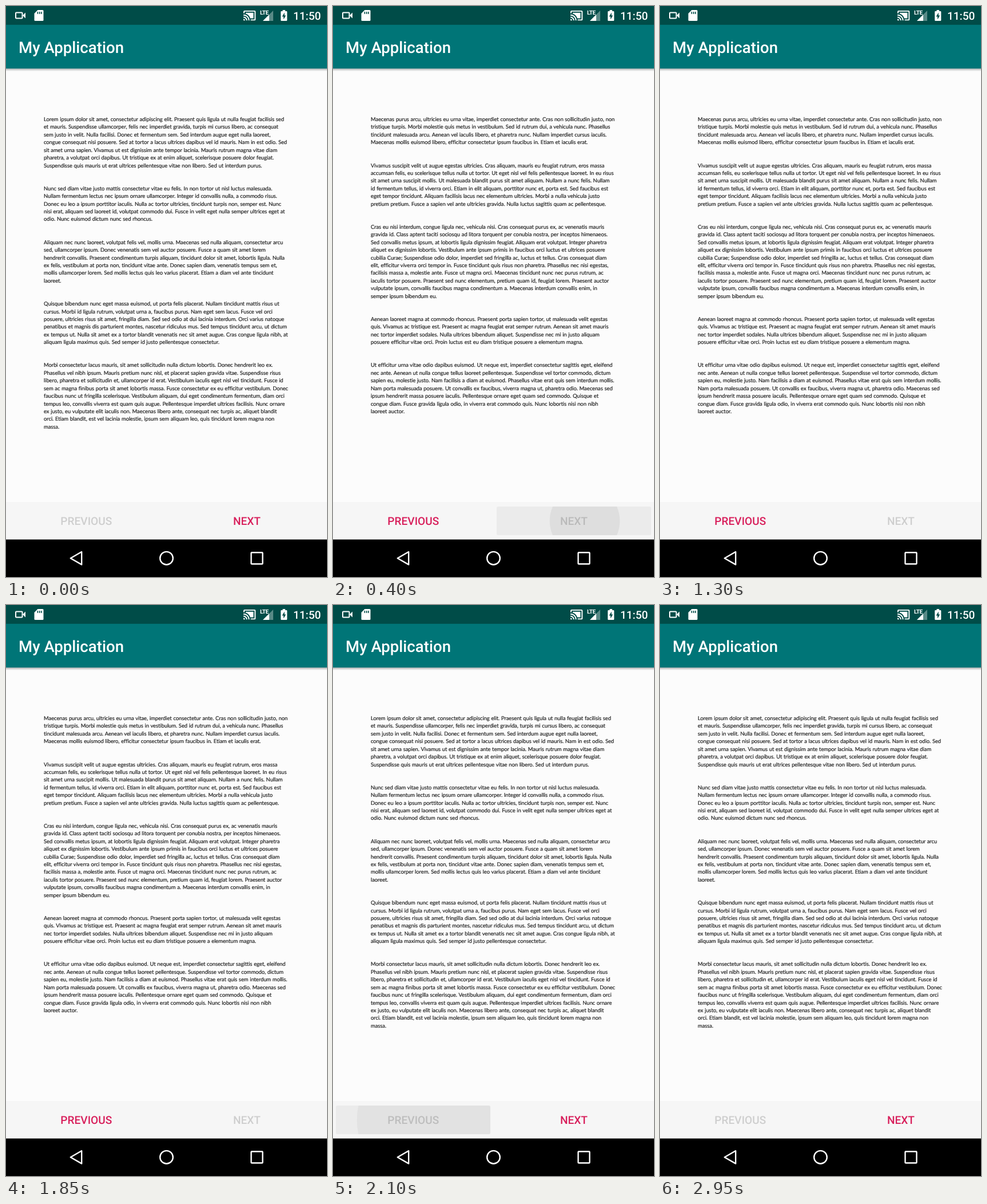
Recreate the animation shown at these times as an HTML page. Size 561 px wide and 997 px high, loop 3 s.

```html
<!DOCTYPE html>
<html lang="en">
<head>
<meta charset="utf-8">
<title>My Application</title>
<style>
  html, body { margin: 0; width: 100%; height: 100%; overflow: hidden; background: #fcfcfc; }
  svg { display: block; width: 100%; height: 100%; }
  text { font-family: Roboto, sans-serif; font-weight: 500; text-rendering: geometricPrecision; }
  .page text { font: 400 9.4px Lato, sans-serif; fill: #222; stroke: #222; stroke-width: .2px; }
  .button { font-size: 19.1px; text-anchor: middle; }
  .lte { font-size: 10px; font-weight: 700; letter-spacing: -.6px; }
</style>
</head>
<body>
<svg viewBox="0 0 561 997">
  <defs>
    <linearGradient id="shade" x2="0" y2="1">
      <stop stop-color="#000" stop-opacity=".3"/>
      <stop offset="1" stop-color="#000" stop-opacity="0"/>
    </linearGradient>
    <clipPath id="prevClip"><rect x="5" y="874" width="270" height="50" rx="2.5"/></clipPath>
    <clipPath id="nextClip"><rect x="286" y="874" width="270" height="50" rx="2.5"/></clipPath>
  </defs>
  <rect width="561" height="997" fill="#fcfcfc"/>
  <g class="page"></g>
  <g class="page"></g>

  <!-- app bar -->
  <rect y="109" width="561" height="5" fill="url(#shade)"/>
  <rect y="32" width="561" height="77.200" fill="#007577"/>
  <text x="22" y="81.500" font-size="27.600" fill="#fff">My Application</text>

  <!-- status bar -->
  <rect width="561" height="32.800" fill="#004c48"/>
  <g fill="#fff">
    <rect x="17" y="11.500" width="11.500" height="10" rx="1" fill="none" stroke="#fff" stroke-width="2"/>
    <path d="M29 16.500L34 11.500V21.500Z"/>
    <path d="M55.500 7H64q1.500 0 1.500 1.500V24.500q0 1.500-1.500 1.500H51q-1.500 0-1.500-1.500V13Z"/>
    <path d="M55.500 10v4M58.800 10v4M62 10v4" stroke="#004c48" stroke-width="1.600"/>
    <path transform="translate(414 5) scale(.97)" d="M1 18v3h3c0-1.660-1.340-3-3-3zm0-4v2c2.760 0 5 2.240 5 5h2c0-3.870-3.130-7-7-7zm18-7H5v1.630c3.960 1.280 7.090 4.410 8.370 8.370H19V7zM1 10v2c4.970 0 9 4.030 9 9h2c0-6.080-4.930-11-11-11zm20-7H3c-1.100 0-2 .9-2 2v3h2V5h18v14h-7v2h7c1.100 0 2-.9 2-2V5c0-1.100-.9-2-2-2z"/>
    <text class="lte" x="444" y="15">LTE</text>
    <path d="M467 8V26H449Z" opacity=".35"/>
    <path d="M460 15V26H449Z"/>
    <path d="M483.500 7h4.500v2h2q1.300 0 1.300 1.300V24.700q0 1.300-1.300 1.300h-8.500q-1.300 0-1.300-1.300V10.300q0-1.300 1.300-1.300h2Z"/>
    <path d="M486.700 11.500L482.500 18.500H485V23.500L489.200 16.500H486.700Z" fill="#004c48"/>
    <text x="501.900" y="24" font-size="19.100">11:50</text>
  </g>

  <!-- buttons -->
  <rect y="866" width="561" height="66" fill="#f6f6f6"/>
  <g id="prevTouch" clip-path="url(#prevClip)">
    <rect y="866" width="281" height="66"/><circle cx="160" cy="899"/>
  </g>
  <g id="nextTouch" clip-path="url(#nextClip)">
    <rect x="280" y="866" width="281" height="66"/><circle cx="440" cy="899"/>
  </g>
  <text id="prev" class="button" x="140.300" y="906">PREVIOUS</text>
  <text id="next" class="button" x="420.900" y="906">NEXT</text>

  <!-- navigation bar -->
  <rect y="931.500" width="561" height="66"/>
  <g fill="none" stroke="#fff" stroke-width="2.400" stroke-linejoin="round">
    <path d="M112.800 964.200L132.200 953V975.400Z"/>
    <circle cx="280.500" cy="964.200" r="11.300"/>
    <rect x="428.500" y="954.300" width="20" height="20" rx="1"/>
  </g>
</svg>
<script>
const pages = [`Lorem ipsum dolor sit amet, consectetur adipiscing elit. Praesent quis ligula ut nulla feugiat facilisis sed
et mauris. Suspendisse ullamcorper, felis nec imperdiet gravida, turpis mi cursus libero, ac consequat
sem justo in velit. Nulla facilisi. Donec et fermentum sem. Sed interdum augue eget nulla laoreet,
congue consequat nisi posuere. Sed at tortor a lacus ultrices dapibus vel id mauris. Nam in est odio. Sed
sit amet urna sapien. Vivamus ut est dignissim ante tempor lacinia. Mauris rutrum magna vitae diam
pharetra, a volutpat orci dapibus. Ut tristique ex at enim aliquet, scelerisque posuere dolor feugiat.
Suspendisse quis mauris ut erat ultrices pellentesque vitae non libero. Sed ut interdum purus.


Nunc sed diam vitae justo mattis consectetur vitae eu felis. In non tortor ut nisl luctus malesuada.
Nullam fermentum lectus nec ipsum ornare ullamcorper. Integer id convallis nulla, a commodo risus.
Donec eu leo a ipsum porttitor iaculis. Nulla ac tortor ultricies, tincidunt turpis non, semper est. Nunc
nisi erat, aliquam sed laoreet id, volutpat commodo dui. Fusce in velit eget nulla semper ultrices eget at
odio. Nunc euismod dictum nunc sed rhoncus.


Aliquam nec nunc laoreet, volutpat felis vel, mollis urna. Maecenas sed nulla aliquam, consectetur arcu
sed, ullamcorper ipsum. Donec venenatis sem vel auctor posuere. Fusce a quam sit amet lorem
hendrerit convallis. Praesent condimentum turpis aliquam, tincidunt dolor sit amet, lobortis ligula. Nulla
ex felis, vestibulum at porta non, tincidunt vitae ante. Donec sapien diam, venenatis tempus sem et,
mollis ullamcorper lorem. Sed mollis lectus quis leo varius placerat. Etiam a diam vel ante tincidunt
laoreet.


Quisque bibendum nunc eget massa euismod, ut porta felis placerat. Nullam tincidunt mattis risus ut
cursus. Morbi id ligula rutrum, volutpat urna a, faucibus purus. Nam eget sem lacus. Fusce vel orci
posuere, ultricies risus sit amet, fringilla diam. Sed sed odio at dui lacinia interdum. Orci varius natoque
penatibus et magnis dis parturient montes, nascetur ridiculus mus. Sed tempus tincidunt arcu, ut dictum
ex tempus ut. Nulla sit amet ex a tortor blandit venenatis nec sit amet augue. Cras congue ligula nibh, at
aliquam ligula maximus quis. Sed semper id justo pellentesque consectetur.


Morbi consectetur lacus mauris, sit amet sollicitudin nulla dictum lobortis. Donec hendrerit leo ex.
Phasellus vel nibh ipsum. Mauris pretium nunc nisl, et placerat sapien gravida vitae. Suspendisse risus
libero, pharetra et sollicitudin et, ullamcorper id erat. Vestibulum iaculis eget nisl vel tincidunt. Fusce id
sem ac magna finibus porta sit amet lobortis massa. Fusce consectetur ex eu efficitur vestibulum. Donec
faucibus nunc ut fringilla scelerisque. Vestibulum aliquam, dui eget condimentum fermentum, diam orci
tempus leo, convallis viverra est quam quis augue. Pellentesque imperdiet ultrices facilisis. Nunc ornare
ex justo, eu vulputate elit iaculis non. Maecenas libero ante, consequat nec turpis ac, aliquet blandit
orci. Etiam blandit, est vel lacinia molestie, ipsum sem aliquam leo, quis tincidunt lorem magna non
massa.`, `Maecenas purus arcu, ultricies eu urna vitae, imperdiet consectetur ante. Cras non sollicitudin justo, non
tristique turpis. Morbi molestie quis metus in vestibulum. Sed id rutrum dui, a vehicula nunc. Phasellus
tincidunt malesuada arcu. Aenean vel iaculis libero, et pharetra nunc. Nullam imperdiet cursus iaculis.
Maecenas mollis euismod libero, efficitur consectetur ipsum faucibus in. Etiam et iaculis erat.


Vivamus suscipit velit ut augue egestas ultricies. Cras aliquam, mauris eu feugiat rutrum, eros massa
accumsan felis, eu scelerisque tellus nulla ut tortor. Ut eget nisl vel felis pellentesque laoreet. In eu risus
sit amet urna suscipit mollis. Ut malesuada blandit purus sit amet aliquam. Nullam a nunc felis. Nullam
id fermentum tellus, id viverra orci. Etiam in elit aliquam, porttitor nunc et, porta est. Sed faucibus est
eget tempor tincidunt. Aliquam facilisis lacus nec elementum ultricies. Morbi a nulla vehicula justo
pretium pretium. Fusce a sapien vel ante ultricies gravida. Nulla luctus sagittis quam ac pellentesque.


Cras eu nisi interdum, congue ligula nec, vehicula nisi. Cras consequat purus ex, ac venenatis mauris
gravida id. Class aptent taciti sociosqu ad litora torquent per conubia nostra, per inceptos himenaeos.
Sed convallis metus ipsum, at lobortis ligula dignissim feugiat. Aliquam erat volutpat. Integer pharetra
aliquet ex dignissim lobortis. Vestibulum ante ipsum primis in faucibus orci luctus et ultrices posuere
cubilia Curae; Suspendisse odio dolor, imperdiet sed fringilla ac, luctus et tellus. Cras consequat diam
elit, efficitur viverra orci tempor in. Fusce tincidunt quis risus non pharetra. Phasellus nec nisi egestas,
facilisis massa a, molestie ante. Fusce ut magna orci. Maecenas tincidunt nunc nec purus rutrum, ac
iaculis tortor posuere. Praesent sed nunc elementum, pretium quam id, feugiat lorem. Praesent auctor
vulputate ipsum, convallis faucibus magna condimentum a. Maecenas interdum convallis enim, in
semper ipsum bibendum eu.


Aenean laoreet magna at commodo rhoncus. Praesent porta sapien tortor, ut malesuada velit egestas
quis. Vivamus ac tristique est. Praesent ac magna feugiat erat semper rutrum. Aenean sit amet mauris
nec tortor imperdiet sodales. Nulla ultrices bibendum aliquet. Suspendisse nec mi in justo aliquam
posuere efficitur vitae orci. Proin luctus est eu diam tristique posuere a elementum magna.


Ut efficitur urna vitae odio dapibus euismod. Ut neque est, imperdiet consectetur sagittis eget, eleifend
nec ante. Aenean ut nulla congue tellus laoreet pellentesque. Suspendisse vel tortor commodo, dictum
sapien eu, molestie justo. Nam facilisis a diam at euismod. Phasellus vitae erat quis sem interdum mollis.
Nam porta malesuada posuere. Ut convallis ex faucibus, viverra magna ut, pharetra odio. Maecenas sed
ipsum hendrerit massa posuere iaculis. Pellentesque ornare eget quam sed commodo. Quisque et
congue diam. Fusce gravida ligula odio, in viverra erat commodo quis. Nunc lobortis nisi non nibh
laoreet auctor.`].map(p => p.split('\n'));

const $ = id => document.getElementById(id);
const clamp = v => Math.max(0, Math.min(1, v));
const sheets = document.querySelectorAll('.page');

// one tracking value for all body text, from the combined length of both opening lines
const wordGap = .4;
const pen = document.createElement('canvas').getContext('2d');
pen.font = '400 94px Lato, sans-serif';
const opening = pages[0][0] + pages[1][0];
const gaps = opening.split(' ').length - 1;
const tracking = (849 - pen.measureText(opening).width / 10 - wordGap * gaps) / opening.length;

pages.forEach((lines, i) => {
  sheets[i].style.letterSpacing = tracking + 'px';
  sheets[i].style.wordSpacing = wordGap + 'px';
  sheets[i].innerHTML = lines.map((line, row) =>
    line && `<text x="66" y="${201 + 13.42 * row}">${line}</text>`).join('');
});

const taps = [
  { id: 'nextTouch', down: 324, up: 375 },
  { id: 'prevTouch', down: 1912, up: 2020 }
];

function drawTap({ id, down, up }, t) {
  const [back, ripple] = $(id).children;
  const grow = clamp((t - down) / 300);
  const fade = delay => t < down ? 0 : 1 - clamp((t - up - delay) / 240);
  back.setAttribute('opacity', .045 * clamp((t - down) / 60) * fade(80));
  ripple.setAttribute('opacity', .06 * fade(0));
  ripple.setAttribute('r', 137 * (1 - (1 - grow) ** 2));
}

function setButton(id, enabled) {
  $(id).setAttribute('fill', enabled ? '#d81f5b' : 'rgba(0,0,0,.16)');
}

function frame(now) {
  const t = now % 3000;
  const second = t >= taps[0].up && t < taps[1].up;
  sheets[0].style.display = second ? 'none' : '';
  sheets[1].style.display = second ? '' : 'none';
  setButton('prev', second);
  setButton('next', !second);
  taps.forEach(tap => drawTap(tap, t));
  requestAnimationFrame(frame);
}
frame(0);
</script>
</body>
</html>
```
